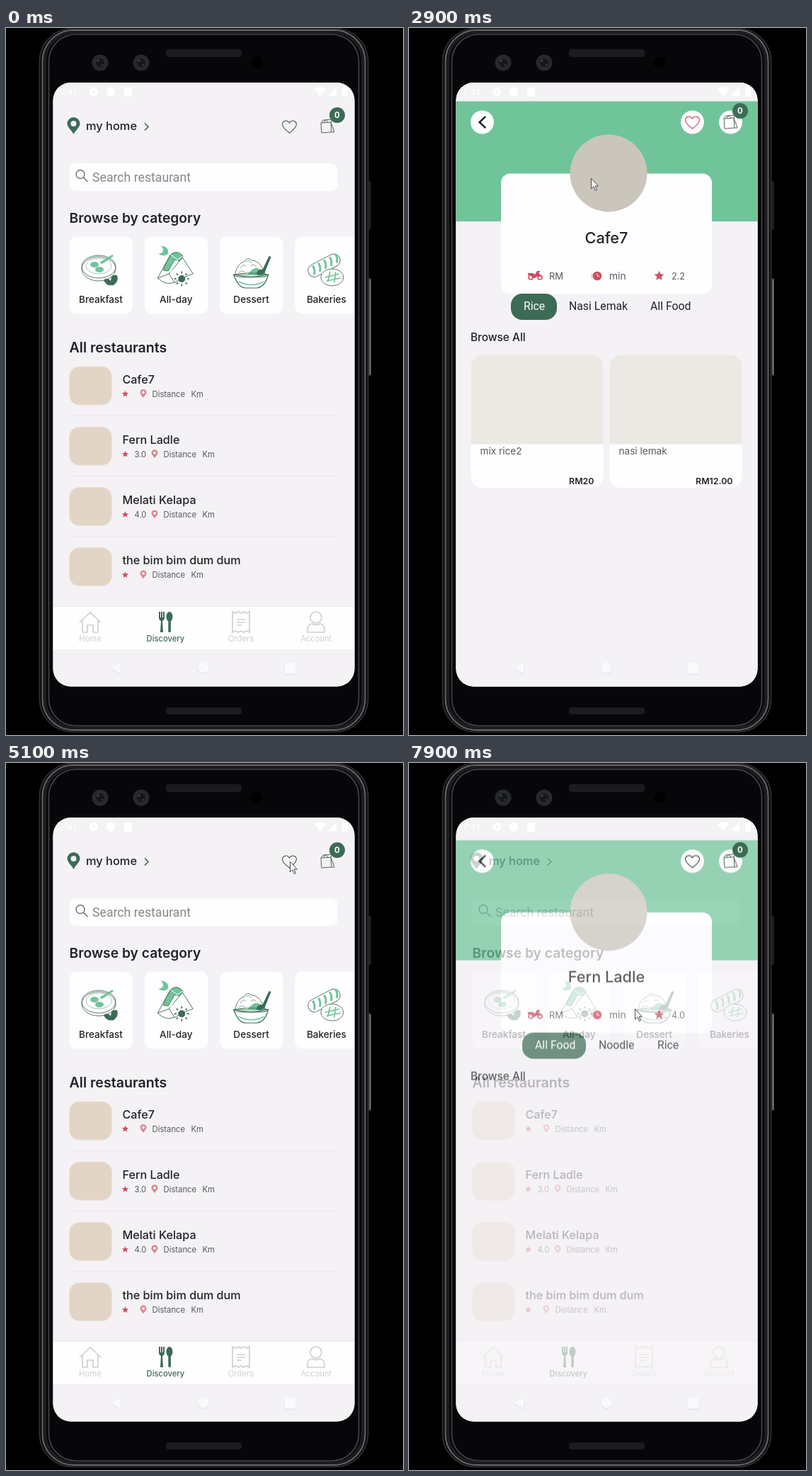
An HTML page with a canvas that plays this animation: 561x998 px, repeating every 8 s.

```html
<!DOCTYPE html>
<html lang="en">
<head>
<meta charset="utf-8">
<title>Food ordering app</title>
<style>
html, body { margin: 0; width: 561px; height: 998px; overflow: hidden; background: #000; }
canvas { display: block; width: 561px; height: 998px; }
</style>
</head>
<body>
<canvas id="stage" width="561" height="998"></canvas>
<script>
const W = 561, H = 998, LOOP = 8000;
const BG = '#f4f2f5', INK = '#242226', GREY = '#5a585c', DARK = '#3c6b56', MINT = '#70c49a';
const RED = '#cb4f60', WHITE = '#fefdff', SAND = '#e2d5c5', PALE = '#d3d0cc', LINE = '#e8e7e9';
const main = document.getElementById('stage').getContext('2d');
const layer = document.createElement('canvas');
layer.width = W; layer.height = H;
let c = main;

// Drawing helpers
function shape(d, fill, stroke, width = 1) {
  const p = typeof d === 'string' ? new Path2D(d) : d;
  if (fill) { c.fillStyle = fill; c.fill(p); }
  if (stroke) { c.strokeStyle = stroke; c.lineWidth = width; c.stroke(p); }
}
function box(x, y, w, h, r, fill, stroke, width) {
  const p = new Path2D();
  p.roundRect(x, y, w, h, r);
  shape(p, fill, stroke, width);
}
function oval(x, y, rx, ry, fill, stroke, width, turn = 0) {
  const p = new Path2D();
  p.ellipse(x, y, rx, ry, turn, 0, Math.PI * 2);
  shape(p, fill, stroke, width);
}
const dot = (x, y, r, ...style) => oval(x, y, r, r, ...style);
function at(x, y, draw, scale = 1, turn = 0) {
  c.save();
  c.translate(x, y);
  c.rotate(turn);
  c.scale(scale, scale);
  draw();
  c.restore();
}
function text(str, x, y, size, weight = 400, color = INK, align = 'left', family = 'Inter') {
  c.font = `${weight} ${size}px ${family}, sans-serif`;
  c.fillStyle = color;
  c.textAlign = align;
  c.fillText(str, x, y);
}

// Small icons
function star(x, y, r) {
  const p = new Path2D();
  for (let i = 0; i < 10; i++) {
    const a = i * Math.PI / 5 - Math.PI / 2, k = i % 2 ? r * 0.45 : r;
    p.lineTo(x + k * Math.cos(a), y + k * Math.sin(a));
  }
  p.closePath();
  shape(p, RED);
}
function pin(x, y, scale, color, hole) {
  at(x, y, () => {
    shape('M0 12C-3 6-9 2-9-3A9 9 0 0 1 9-3C9 2 3 6 0 12Z', color);
    dot(0, -3, 4, hole);
  }, scale);
}
function heart(x, y, color) {
  at(x, y, () => shape('M0 9C-4 6-10 2-10-3.5A5.3 5.3 0 0 1 0-5A5.3 5.3 0 0 1 10-3.5C10 2 4 6 0 9Z', null, color, 1.2));
}
function bag(x, y) {
  at(x, y, () => {
    shape('M-9-5L5-6L6 8L-8 9ZM5-6L10 8L6 8M-9-5L-6-9L7-10L5-6M-5-6Q-3-12 1-6', null, '#56635d', 1);
  });
}
function badge(y) {
  dot(468, y, 11, DARK);
  text('0', 468, y + 4, 11.5, 700, '#fff', 'center');
}
function back(x, y, scale = 1) {
  at(x, y, () => shape('M5.500-9.500L-4.500 0L5.500 9.500', null, INK, 3), scale);
}

// Category pictures, each centred on its own origin
const pictures = {
  'Breakfast'() {
    oval(-3, -3, 24, 16, WHITE, '#5d7a6c', 1);
    oval(-3, 0, 24, 17, null, '#5d7a6c', 1);
    oval(-3, -4, 18, 11, WHITE, '#a7c9b8', 1);
    oval(-9, -6, 6, 4, MINT);
    oval(-2, 1, 6, 4, MINT);
    shape('M-2-9L16-20L18-18L2-7Z', MINT);
    shape('M4 16Q9 11 14 17Q14 7 23 9Q26 17 18 23Q8 25 4 16Z', DARK);
  },
  'All-day'() {
    shape('M-21-33Q-14-23-25-21Q-16-16-11-22Q-10-31-21-33Z', MINT);
    shape('M-26 13L-8-20Q2-28 9-16L24 7L13 11L-2 19Q-15 24-26 13ZM-26 13L-10 7L9-16M-10 7L-2 19', WHITE, '#4e7764', 1);
    shape('M-14-9L-6-21Q2-27 10-18L5-11L-2-13L-11 3L-18 2Z', MINT, '#4e7764', 1);
    shape('M-8-20L2-13L-8 5M2-13L10-18', null, WHITE, 1);
    dot(8, 14, 5, DARK);
    for (let i = 0; i < 8; i++) at(8, 14, () => shape('M7.5 0H10.5', null, DARK, 1.7), 1, i * Math.PI / 4);
  },
  'Dessert'() {
    shape('M-23 8Q-20-8-10-10Q-6-18 1-12Q10-12 16 0L21 9Z', WHITE, '#66816f', 1);
    shape('M-15-1Q-12-8-8-4M-7-10Q-3-14 0-8M-1-4Q4-8 7-3M-18 5Q-12 1-9 5', null, '#8aa697', 1);
    shape('M-6 9Q4-5 11 0Q18 1 20 9Z', MINT);
    shape('M25-18L28-17L19 5Q12 12 7 7Q9 0 16 1Z', DARK);
    shape('M-25 8Q-18 27-8 27H8Q20 25 24 8Q0 14-25 8Z', WHITE, DARK, 1.2);
    oval(0, 9, 24, 3, null, DARK, 1);
    shape('M-18 18Q0 27 18 18', null, MINT, 1.5);
  },
  'Bakeries'() {
    at(-3, -5, () => {
      box(-25, -9, 49, 18, 9, WHITE, '#5d7a6c', 1);
      for (let x = -17; x < 20; x += 9) shape(`M${x - 2} 5Q${x + 3} 0 ${x + 2}-7`, null, MINT, 3);
    }, 1, -0.48);
    oval(8, 12, 16, 12, WHITE, '#5d7a6c', 1);
    shape('M-2 12L18 7M0 17L20 13M5 4L2 18M13 4L11 19', null, MINT, 1.7);
  }
};

// Pages
const SHOPS = [
  { name: 'Cafe7', score: '2.2', chips: [['Rice', 162], ['Nasi Lemak', 226], ['All Food', 341]], pill: [144, 65],
    food: [['mix rice2', 'RM20'], ['nasi lemak', 'RM12.00']] },
  { name: 'Fern Ladle', rating: '3.0', score: '4.0', chips: [['All Food', 178], ['Noodle', 268], ['Rice', 351]], pill: [160, 90], food: [] },
  { name: 'Melati Kelapa', rating: '4.0' },
  { name: 'the bim bim dum dum' }
];
const [cafe, ladle, melati] = SHOPS;

function row(shop, x, y, width, last) {
  box(x, y, 60, 54, 14, SAND, '#ebe2d8', 1);
  text(shop.name, x + 75, y + 23.5, 16.2, 500);
  star(x + 79, y + 38.5, 4.8);
  const shift = shop.rating ? 16 : 0;
  if (shift) text(shop.rating, x + 92, y + 42.5, 11.2, 400, GREY);
  pin(x + 104.5 + shift, y + 38, 0.5, '#de8490', BG);
  text('Distance', x + 117 + shift, y + 42.5, 11.3, 400, GREY);
  text('Km', x + 172 + shift, y + 42.5, 11.3, 400, GREY);
  if (!last) shape(`M${x} ${y + 69.7}h${width}`, null, LINE, 1);
}

function tabBar() {
  c.fillStyle = WHITE;
  c.fillRect(66, 817, 427, 60);
  shape('M66 816h427', null, '#ecebee', 1.5);
  at(119, 838, () => shape('M-15 1L0-13L15 1M-11-2V15H-4V5H4V15H11V-2', null, PALE, 1.7));
  at(225, 838, () => {
    shape('M-9-14V-6Q-9-2-6-1L-7 15H-3L-4-1Q-1-2-1-6V-14H-3V-6H-4V-14H-6V-6H-7V-14Z', DARK);
    oval(6, -7, 4.5, 7, DARK);
    box(4.3, -2, 3.6, 17, 1.5, DARK);
  });
  at(332, 838, () => {
    shape('M-12-14L-8-12L-4-14L0-12L4-14L8-12L12-14V15L8 13L4 15L0 13L-4 15L-8 13L-12 15Z', null, PALE, 1.7);
    shape('M-6-3H6M-6 1H6M-6 5H1', null, PALE, 1.6);
  });
  at(438, 838, () => {
    dot(0, -6, 8, null, PALE, 1.7);
    shape('M-12 15Q-13 4-6 3Q0 6 6 3Q13 4 12 15Z', null, PALE, 1.7);
  });
  ['Home', 'Discovery', 'Orders', 'Account'].forEach((s, i) =>
    text(s, 119 + i * 106.4, 865.5, 11.2, i === 1 ? 500 : 400, i === 1 ? DARK : PALE, 'center'));
}

function home() {
  pin(95.5, 138, 1, DARK, BG);
  text('my home', 113, 144, 16.4, 500);
  shape('M196 134.500l5 5l-5 5', null, DARK, 1.7);
  heart(400.5, 139, '#4f675c');
  bag(454, 139);
  badge(123);
  box(89.5, 191, 379, 39, 9, WHITE);
  dot(105, 206.5, 6, null, '#737177', 1.4);
  shape('M109.500 211L115.500 217', null, '#737177', 1.5);
  text('Search restaurant', 122, 217, 17.7, 400, '#89878b', 'left', 'Roboto');
  text('Browse by category', 89.5, 274.5, 19.3, 600);
  Object.entries(pictures).forEach(([label, draw], i) => {
    const x = 89.5 + i * 106.3;
    box(x, 294.5, 89.5, 109, 10, WHITE);
    at(x + 44.5, 340, draw);
    text(label, x + 44.5, 387.5, 13.6, 500, INK, 'center');
  });
  text('All restaurants', 89.5, 457.5, 19.6, 600);
  SHOPS.forEach((s, i) => row(s, 89.5, 478 + i * 85.2, 379, i === 3));
  tabBar();
}

function favourites(shops) {
  back(102.5, 134);
  text('Favourite Vendors', 100, 189, 22.9, 500);
  shops.forEach((s, i) => row(s, 100, 211.3 + i * 85.2, 357));
}

function shopPage(shop, liked) {
  c.fillStyle = MINT;
  c.fillRect(66, 102.5, 427, 169.5);
  [103.5, 400.5, 454.5].forEach(x => dot(x, 132, 16.5, WHITE));
  back(103.5, 132, 0.85);
  heart(400.5, 132, liked ? RED : '#454a48');
  bag(454, 132);
  badge(116);
  box(130, 204.5, 298, 170, 13, WHITE);
  dot(282, 204, 54.5, '#cbc6bc');
  text(shop.name, 279, 303, 21.7, 500, INK, 'center');
  at(178, 348, () => {
    dot(-6, 3, 3, null, RED, 1.6);
    dot(7, 3, 3, null, RED, 1.6);
    shape('M-10-3H-3L0-1L3-6H7V-4H5L9 2H2L0 4H-4Q-5-1-10 0Z', RED);
  });
  text('RM', 198, 353.5, 13, 400, GREY);
  dot(266, 349, 6.3, RED);
  shape('M266 345.500V349.500H269', null, WHITE, 1);
  shape('M258.500 345V352', null, '#e6a4ac', 1);
  text('min', 283, 353.5, 13.8, 400, GREY);
  star(353.5, 349, 7.3);
  text(shop.score, 371, 353.5, 12.6, 400, GREY);
  box(shop.pill[0], 374, shop.pill[1], 37, 16, DARK);
  shop.chips.forEach(([label, x], i) => text(label, x, 397, 15.8, 400, i ? INK : WHITE, 'left', 'Roboto'));
  text('Browse All', 87, 440.5, 15.4, 500);
  shop.food.forEach(([dish, price], i) => {
    const x = 87.5 + i * 196;
    box(x, 460.5, 187, 187.5, 16, WHITE);
    box(x, 460.5, 187, 126, [16, 16, 0, 0], '#ebe9e3');
    text(dish, x + 13, 600.5, 13.6, 400, GREY);
    text(price, x + 174, 642.5, 12.4, 600, INK, 'right');
  });
}

// Screen changes: push slides a page in from below, pop lets it fall away
const both = () => favourites([cafe, melati]);
const single = () => favourites([melati]);
const cafePage = t => shopPage(cafe, t < 3400);
const steps = [
  { start: -999, page: home },
  { start: 865, page: both },
  { start: 2701, page: cafePage },
  { start: 3880, page: both, pop: true },
  { start: 4530, page: home, pop: true },
  { start: 5460, page: single },
  { start: 6940, page: home, pop: true },
  { start: 7770, page: () => shopPage(ladle, false) }
];

function fade(p) {
  if (p < 0.5) return p / 2;
  return p < 0.9 ? 0.25 + (p - 0.5) * 1.125 : Math.min(1, 0.7 + (p - 0.9) * 4);
}
function drawPage(page, t, shown) {
  c = layer.getContext('2d');
  c.fillStyle = BG;
  c.fillRect(0, 0, W, H);
  page(t);
  c = main;
  c.globalAlpha = fade(shown);
  c.drawImage(layer, 0, 68 * (1 - shown));
  c.globalAlpha = 1;
}
function drawScreen(t) {
  c.save();
  const clip = new Path2D();
  clip.roundRect(66.5, 77, 426, 852.5, 25);
  c.clip(clip);
  c.fillStyle = BG;
  c.fillRect(66, 77, 427, 853);
  const i = steps.findLastIndex(s => s.start <= t);
  const { start, page, pop } = steps[i];
  const k = Math.min(1, (t - start) / (pop ? 150 : 350));
  const shown = pop ? 1 - k : 1 - (1 - k) ** 5;
  if (k === 1) drawPage(page, t, 1);
  else {
    const old = steps[i - 1].page;
    drawPage(pop ? page : old, t, 1);
    drawPage(pop ? old : page, t, shown);
  }
  systemBars();
  c.restore();
}

function systemBars() {
  text('7:41', 76, 95, 13, 400, '#fff', 'left', 'Roboto');
  dot(124, 90, 4, null, '#fff', 4);
  shape('M148 83L154 86V91Q153 95 148 97Q143 95 142 91V86Z', '#fff');
  box(167, 84, 11, 13, 2, '#fff');
  shape('M436 86Q444 80 452 86L444 97Z', '#fff');
  shape('M467 83V96H455Z', '#fff');
  box(475, 83, 8, 14, 1, '#fff');
  c.save();
  c.shadowColor = '#dddce0';
  c.shadowBlur = 2;
  c.shadowOffsetY = 1;
  shape('M148 903.500L162 895.500V911.500Z', '#faf9fb');
  dot(279, 903, 7.5, '#faf9fb');
  box(393.5, 895.5, 16, 16, 1, '#faf9fb');
  c.restore();
}

function drawPhone() {
  c.fillStyle = '#000';
  c.fillRect(0, 0, W, H);
  box(511, 216, 5, 69, 2, '#1d1d20');
  box(511, 353, 5, 138, 2, '#39393d');
  shape('M514.500 355V489', null, '#8a8a8e', 1.2);
  // Metal rim: shaded outer edge, bright ridge, soft inner bevel
  box(47.5, 0.5, 464, 993, 47, '#070609', '#2c2c2f', 2);
  box(51.5, 3, 456, 988, 44, null, '#67676b', 2);
  box(55, 6, 449, 982, 41, null, '#1d1d20', 4);
  box(60.5, 9, 438, 976, 38, null, '#46464a', 1.6);
  box(226, 30, 107, 11, 4, '#1c1b1f');
  box(226, 959, 107, 10, 4, '#1c1b1f');
  [133, 191].forEach(x => {
    dot(x, 49, 11.5, '#27292b');
    dot(x, 49, 6, '#151719');
    dot(x - 3, 46, 1.5, '#4a4d4f');
    dot(x + 3, 52, 1.2, '#3d4042');
  });
  dot(354, 49, 8, '#000');
}

// Pointer path: time, x, y
const path = [
  [100, 440, 290], [500, 402, 139], [950, 402, 139], [1500, 330, 250], [1900, 291, 277],
  [2350, 215, 232], [2650, 220, 230], [2900, 257, 212], [3250, 401, 134], [3450, 401, 134],
  [3750, 104, 133], [3950, 104, 133], [4200, 104, 179], [4400, 103, 136], [4600, 103, 136],
  [5100, 401, 139], [5500, 401, 139], [5900, 217, 271], [6300, 226, 236], [6750, 102, 139],
  [6960, 102, 139], [7100, 209, 397], [7250, 225, 580], [7400, 225, 580], [7600, 319, 347], [8000, 319, 347]
];
function drawPointer(t) {
  const i = path.findIndex(p => p[0] > t);
  if (i < 1) return;
  const [t0, x0, y0] = path[i - 1], [t1, x1, y1] = path[i];
  const u = (t - t0) / (t1 - t0), k = u * u * (3 - 2 * u);
  at(x0 + (x1 - x0) * k, y0 + (y1 - y0) * k, () =>
    shape('M0.500 0V15L3.800 11.700L6.300 17.500L8.500 16.500L6 11H10.300Z', '#f8f7f9', '#4c4b4f', 1));
}

function frame(now) {
  const t = now % LOOP;
  drawPhone();
  drawScreen(t);
  drawPointer(t);
  requestAnimationFrame(frame);
}
requestAnimationFrame(frame);
</script>
</body>
</html>
```
